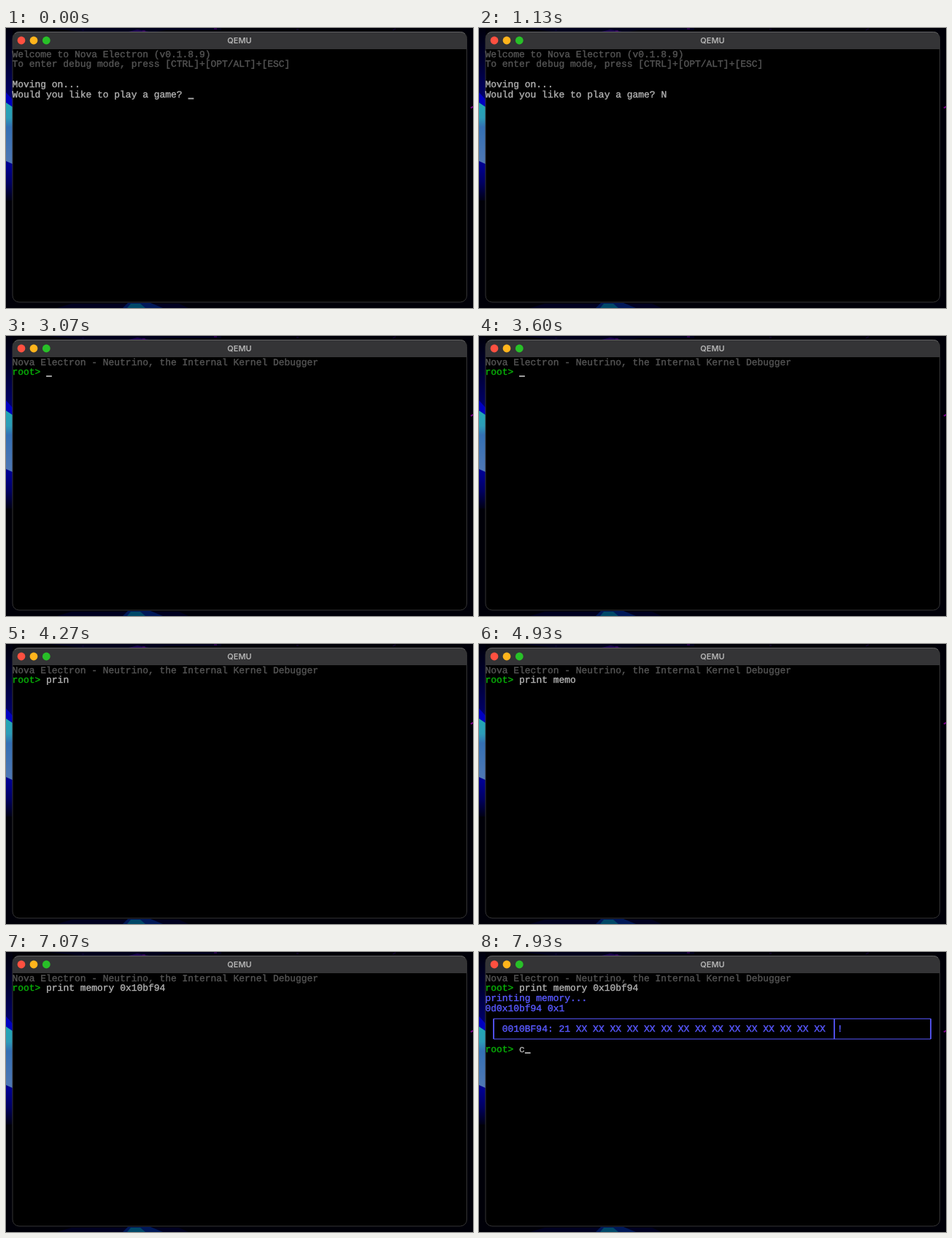
Write an HTML page that moves like this. It is 640 px wide and 383 px high and loops after 8000 ms.

```html
<!DOCTYPE html>
<html lang="en">
<head>
<meta charset="utf-8">
<title>Terminal</title>
<style>
  html, body { margin: 0; width: 100%; height: 100%; overflow: hidden; background: #000; }
  svg { display: block; width: 100%; height: 100%; }
  #screen text {
    font: 12.965px "Liberation Mono", "DejaVu Sans Mono", monospace;
    white-space: pre;
    text-rendering: geometricPrecision;
    stroke-width: .4px;
  }
  #title { font: 600 11px Inter, Roboto, sans-serif; text-anchor: middle; }
</style>
</head>
<body>
<svg viewBox="0 0 640 383">
  <defs>
    <linearGradient id="glow" x2="0" y2="1">
      <stop offset="0" stop-color="#00000c"/>
      <stop offset=".2" stop-color="#000030"/>
      <stop offset=".45" stop-color="#000078"/>
      <stop offset=".8" stop-color="#000090"/>
      <stop offset=".9" stop-color="#000060"/>
      <stop offset="1" stop-color="#000014"/>
    </linearGradient>
    <linearGradient id="beam" x2="0" y2="1">
      <stop offset="0" stop-color="#20a8b4"/>
      <stop offset=".25" stop-color="#2c9cb8"/>
      <stop offset=".4" stop-color="#3470b4"/>
      <stop offset="1" stop-color="#5078b4"/>
    </linearGradient>
  </defs>
  <rect width="640" height="383" fill="#000008"/>
  <rect width="9" height="236" fill="url(#glow)"/>
  <path d="M0 88L9 98V108L0 102Z" fill="#0000c0"/>
  <path d="M0 102L9 108V186L0 182Z" fill="url(#beam)"/>
  <path d="M60 0H295V3H220L205 5H100Z" fill="#00001c"/>
  <path d="M168 5L180 2L196 5Z" fill="#1c0050"/>
  <path d="M187 4H191M285 1H289" stroke="#500070"/>
  <path d="M530 3L534 1M104 3H107M398 2H401" stroke="#18003c"/>
  <path d="M637 109.5L640 107.5" stroke="#800090" stroke-width="2"/>
  <path d="M70 383L90 377H237L250 383Z" fill="#000020"/>
  <path d="M160 383L167 376H198L215 383Z" fill="#001858"/>
  <path d="M166 383L171 377H184L191 383Z" fill="#004868"/>

  <rect x="9" y="5.5" width="622.5" height="369.5" rx="9" fill="#000"/>
  <path d="M9 29V14.5Q9 5.5 18 5.5H622.5Q631.5 5.5 631.5 14.5V29Z" fill="#343436"/>
  <rect x="9" y="5.5" width="622.5" height="369.5" rx="9" fill="none" stroke="#343434"/>
  <path d="M12 8Q14 5.5 18 5.5H622.5Q627 5.5 629 8" fill="none" stroke="#606060"/>
  <circle cx="21" cy="17" r="5.4" fill="#ff5040"/>
  <circle cx="38" cy="17" r="5.4" fill="#ffb41c"/>
  <circle cx="55.3" cy="17" r="5.4" fill="#28c028"/>
  <text id="title" x="320" y="20.8" fill="#b4b4b4">QEMU</text>
  <g id="screen"></g>
</svg>
<script>
const LOOP = 8000, CELL_W = 7.78, CELL_H = 13.85, LEFT = 8.4, TOP = 29;
const BLINK = 247, BLINK_START = 3700, KEY_HIDE = 100;
const DIM = '#545454', PALE = '#b0b0b0', MAGENTA = '#a800a8', PINK = '#ff54ff',
      GREEN = '#08b008', BLUE = '#5858ff';

const SUBMIT_ANSWER = 2000, OPEN_DEBUGGER = 2870, SUBMIT_COMMAND = 7200;
const answer = { text: 'No?', times: [1070, 1270, 1470] };
const command = {
  text: 'print memory 0x10bf94',
  times: [...Array.from({ length: 10 }, (_, i) => 3930 + i * 105),
          5000, 5130, 5200, 5270, 5470, 5600, 5730, 5870, 6000, 6130, 6270]
};
const next = { text: 'c', times: [7800] };

const screen = document.getElementById('screen');
const x = col => LEFT + col * CELL_W;
const y = row => TOP + row * CELL_H;
const text = (row, col, str, color) =>
  `<text x="${x(col)}" y="${y(row) + 10.6}" fill="${color}" stroke="${color}">${str}</text>`;
const cursor = (row, col) =>
  `<rect x="${x(col)}" y="${y(row) + 11.2}" width="${CELL_W}" height="1.8" fill="${PALE}"/>`;

function input(row, col, { text: str, times }, t, active = true) {
  const count = times.filter(time => time <= t).length;
  const settled = !count || t - times[count - 1] > KEY_HIDE;
  const phase = Math.floor((t - BLINK_START) / BLINK);
  const lit = active && settled && phase % 2 !== 0;
  return text(row, col, str.slice(0, count), PALE) + (lit ? cursor(row, col + count) : '');
}

const prompt = row => text(row, 0, 'root&gt;', GREEN);

function game(t) {
  const submitted = t >= SUBMIT_ANSWER;
  let out = text(0, 0, 'Welcome to Nova Electron (v0.1.8.9)', DIM)
    + text(1, 0, 'To enter debug mode, press [CTRL]+[OPT/ALT]+[ESC]', DIM)
    + text(3, 0, 'Moving on...', PALE)
    + text(4, 0, 'Would you like to play a game?', PALE)
    + input(4, 31, answer, t, !submitted);
  if (submitted) {
    out += text(5, 0, "Either way, you're playing!", MAGENTA)
      + text(6, 0, 'Welcome to the Number Guesser Game! I have a number between 1 and 100. Guess it', PALE)
      + text(7, 0, 'in 7 attempts!', PALE)
      + text(8, 0, 'Hint: the secret is at memory address', PALE)
      + text(8, 38, '0x10bf94', PINK);
  }
  return out;
}

function memoryDump() {
  const left = x(1.5), right = x(78.5), split = x(61.5), top = y(4.5), bottom = y(6.5);
  return text(2, 0, 'printing memory...', BLUE)
    + text(3, 0, '0d0x10bf94 0x1', BLUE)
    + `<path d="M${left} ${top}H${right}M${left} ${bottom}H${right}" stroke="${BLUE}"/>`
    + `<path d="M${left} ${top}V${bottom}M${split} ${top}V${bottom}M${right} ${top}V${bottom}"
        stroke="${BLUE}" stroke-width="1.8"/>`
    + text(5, 3, '0010BF94: 21' + ' XX'.repeat(15), BLUE)
    + text(5, 62, '!', BLUE);
}

function debuggerView(t) {
  const submitted = t >= SUBMIT_COMMAND;
  let out = text(0, 0, 'Nova Electron - Neutrino, the Internal Kernel Debugger', DIM)
    + prompt(1) + input(1, 6, command, t, t < 6900);
  if (submitted) out += memoryDump() + prompt(7) + input(7, 6, next, t);
  return out;
}

let shown = '';
function render(t) {
  const markup = t < OPEN_DEBUGGER ? game(t) : debuggerView(t);
  if (markup !== shown) screen.innerHTML = shown = markup;
}

const start = performance.now();
function tick() {
  render((performance.now() - start) % LOOP);
  requestAnimationFrame(tick);
}
tick();
</script>
</body>
</html>
```
